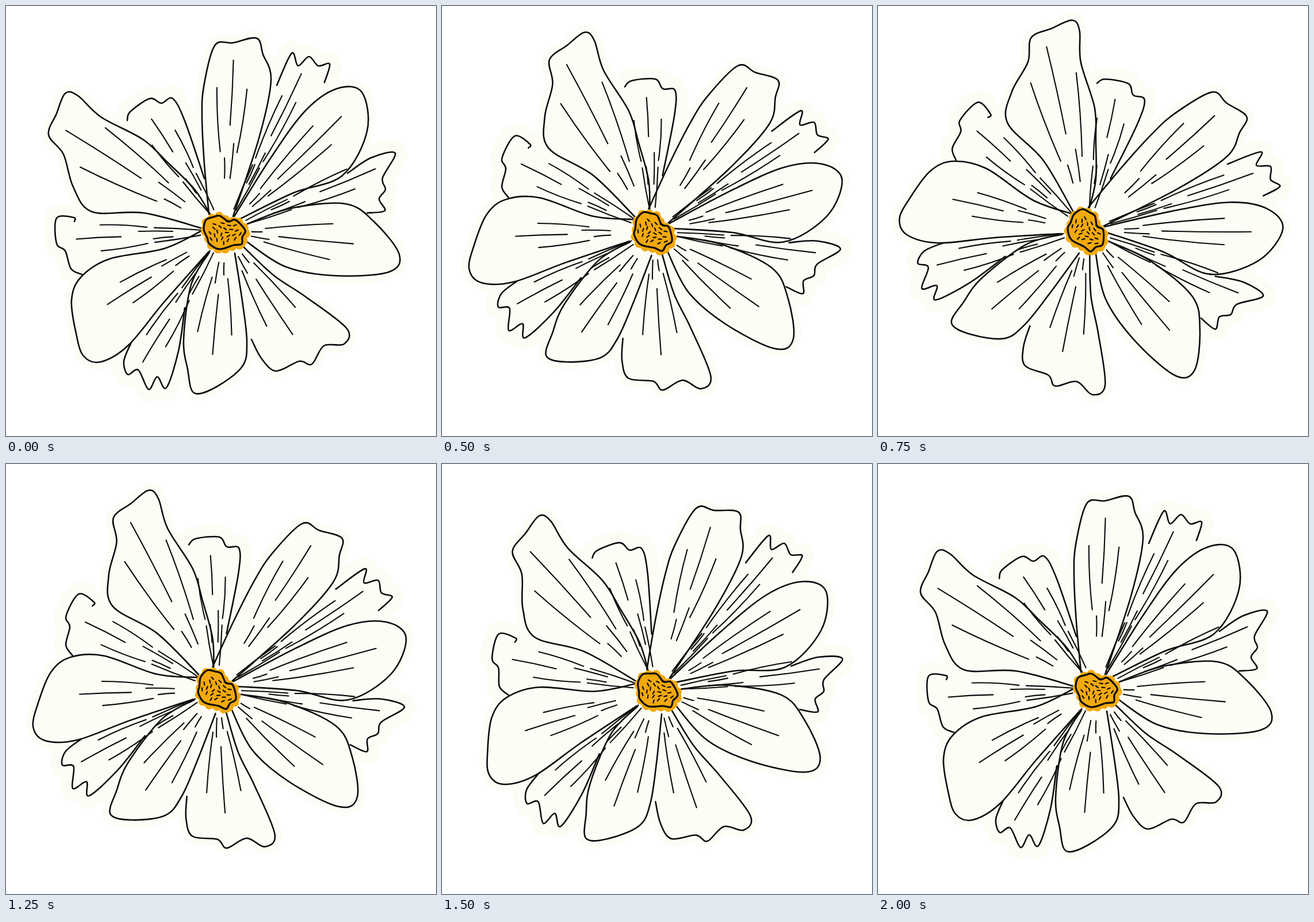
Recreate the animation shown at these times as an HTML page. Size 748 px wide and 748 px high, loop 2.25 s.

```html
<!DOCTYPE html>
<html lang="en">
<head>
<meta charset="utf-8">
<title>Turning flower</title>
<style>
  html, body { margin: 0; width: 100%; height: 100%; overflow: hidden; background: #fff; }
  svg { display: block; width: 100vw; height: 100vh; }
  path { fill: none; stroke: #0b0b0b; stroke-linecap: round; stroke-linejoin: round; }
  .halo { fill: #fdfcf5; stroke: #fdfcf5; stroke-width: 26; }
  .halo.back { stroke-width: 42; }
  .edge { stroke-width: 2.6; }
  .vein { stroke-width: 2.1; }
  .heart { fill: #f2a90b; stroke: #f2a90b; stroke-width: 9; }
  .bumps { stroke: #f2a90b; stroke-width: 15; stroke-dasharray: 0 13; }
  .ring { stroke-width: 3.2; }
  .seed { stroke-width: 2.2; }
</style>
</head>
<body>
<svg viewBox="0 0 748 748"><g id="flower"></g></svg>
<script>
const flower = document.getElementById('flower');
const heart = { x: 380, y: 392 };

// Key points of each outline; fan = first and last vein bearing, then the
// near and far radius of the middle vein. Back petals are only partly outlined.
const petals = [
  { fan: [204, 221, 172, 327], edge: `355,362 328,319 281,272 238,232 165,193 125,156 103,152 88,187
      74,224 100,258 117,315 150,358 240,360 342,387` },
  { fan: [230, 244, 165, 233], back: true, edge: '211,199 216,184 250,161 270,169 290,161 311,200 345,300' },
  { fan: [267, 279, 185, 298], edge: `353,362 345,275 341,195 344,140 363,69 395,64 436,56 447,84
      461,130 440,230 395,366` },
  { fan: [293, 299, 185, 305], back: true, edge: '471,138 497,82 508,104 527,88 543,104 563,101 554,133' },
  { fan: [310, 321, 130, 285], edge: `397,366 460,265 520,183 575,144 619,150 628,218 585,295
      500,325 408,370` },
  { fan: [333, 342, 180, 284], back: true, edge: `594,291 635,264 677,256 655,299 660,319 649,336
      659,356 628,360` },
  { fan: [356, 375, 95, 225], edge: `420,379 495,352 590,344 640,375 684,432 665,463 570,469
      485,453 416,408` },
  { fan: [47, 66, 100, 215], edge: `427,580 445,614 470,635 510,618 532,623 553,591 588,588 592,560
      520,505 465,468 410,416` },
  { fan: [86, 105, 110, 215], edge: `398,430 412,520 419,585 411,627 365,663 327,673 316,632 309,580
      322,485 354,428` },
  { fan: [117, 127, 180, 268], back: true, edge: `218,585 205,618 212,641 230,633 248,667 263,645
      279,664 300,600 311,525` },
  { fan: [142, 154, 150, 240], edge: `340,391 275,422 180,440 130,472 114,512 122,570 135,609 165,619
      213,590 275,515 352,428` },
  { fan: [171, 183, 180, 258], back: true, edge: '132,467 113,457 103,426 88,413 88,369 118,368 119,375' }
];

const ring = `344,388 348,372 361,367 372,365 387,375 399,372 416,390 411,402 410,414 396,416
  372,423 354,414 350,403`;

const parse = text => text.trim().split(/\s+/).map(p => p.split(',').map(Number));
const fix = n => n.toFixed(1);

// Catmull-Rom spline through the points, as cubic curves.
function curve(text, closed) {
  const pts = parse(text), n = pts.length;
  const at = i => pts[closed ? (i + n) % n : Math.max(0, Math.min(n - 1, i))];
  let d = 'M' + pts[0];
  for (let i = 0; i < (closed ? n : n - 1); i++) {
    const [a, b, c, e] = [at(i - 1), at(i), at(i + 1), at(i + 2)];
    const nums = [0, 1].map(k => b[k] + (c[k] - a[k]) / 6)
      .concat([0, 1].map(k => c[k] - (e[k] - b[k]) / 6), c);
    d += 'C' + nums.map(fix).join(' ');
  }
  return closed ? d + 'Z' : d;
}

function spot(bearing, radius) {
  const a = bearing * Math.PI / 180;
  return fix(heart.x + radius * Math.cos(a)) + ' ' + fix(heart.y + radius * Math.sin(a));
}

// A slightly bowed stroke pointing at the heart.
function ray(bearing, near, far, bow = 0.5) {
  return `M${spot(bearing, near)}Q${spot(bearing + bow, (near + far) / 2)} ${spot(bearing, far)}`;
}

// Middle vein reaches furthest, short ticks sit closer in between.
function veins({ fan: [first, last, near, far], back }) {
  const bearing = t => first + (last - first) * (t + 1) / 2;
  let d = '';
  for (const t of [-1, 0, 1]) {
    const side = Math.abs(t);
    d += ray(bearing(t), near * (1 - 0.25 * side), far * (1 - 0.16 * side), t || 0.4);
    if (back && side) d += ray(bearing(t), 42, near * 0.68, t);
  }
  for (const t of [-0.5, 0.5]) d += ray(bearing(t), near * 0.5, near * (0.76 + 0.14 * t));
  return d;
}

function add(name, d, move) {
  const el = document.createElementNS('http://www.w3.org/2000/svg', 'path');
  el.setAttribute('class', name);
  el.setAttribute('d', d);
  if (move) el.setAttribute('transform', move);
  flower.appendChild(el);
}

petals.forEach(p => add(p.back ? 'halo back' : 'halo', `${curve(p.edge)}L${heart.x} ${heart.y}Z`));
petals.forEach(p => {
  add('edge', curve(p.edge));
  add('vein', veins(p));
});

const ringPath = curve(ring, true);
add('heart', ringPath, 'translate(2 1)');
add('bumps', ringPath, 'translate(2 1)');
add('ring', ringPath);

// Seeds on a sunflower spiral.
let seeds = '';
for (let i = 0; i < 24; i++) {
  const r = 5.2 * Math.sqrt(i + 0.5), a = i * 2.4, turn = i * 1.9;
  const x = heart.x + 1.15 * r * Math.cos(a), y = heart.y + 2 + 0.8 * r * Math.sin(a);
  const dx = 2.6 * Math.cos(turn), dy = 2.6 * Math.sin(turn);
  seeds += `M${fix(x - dx)} ${fix(y - dy)}L${fix(x + dx)} ${fix(y + dy)}`;
}
add('seed', seeds);

// Each pose: angle, then where the stage centre lands.
const rest = [0, 374, 374];
const lean = [15, 373.5, 374.7];
const tilt = [30, 371.7, 373.5];
const swing = [45, 372.5, 373.3];
const far = [67.2, 362.6, 371.3];
const poses = [rest, lean, tilt, swing, far, tilt, lean, far, rest];
const STEP = 250;

function draw(ms) {
  const [angle, x, y] = poses[Math.floor(ms / STEP) % poses.length];
  flower.setAttribute('transform', `translate(${x} ${y}) rotate(${angle}) translate(-374 -374)`);
}

const start = performance.now();
function tick() {
  draw(performance.now() - start);
  requestAnimationFrame(tick);
}
tick();
</script>
</body>
</html>
```
